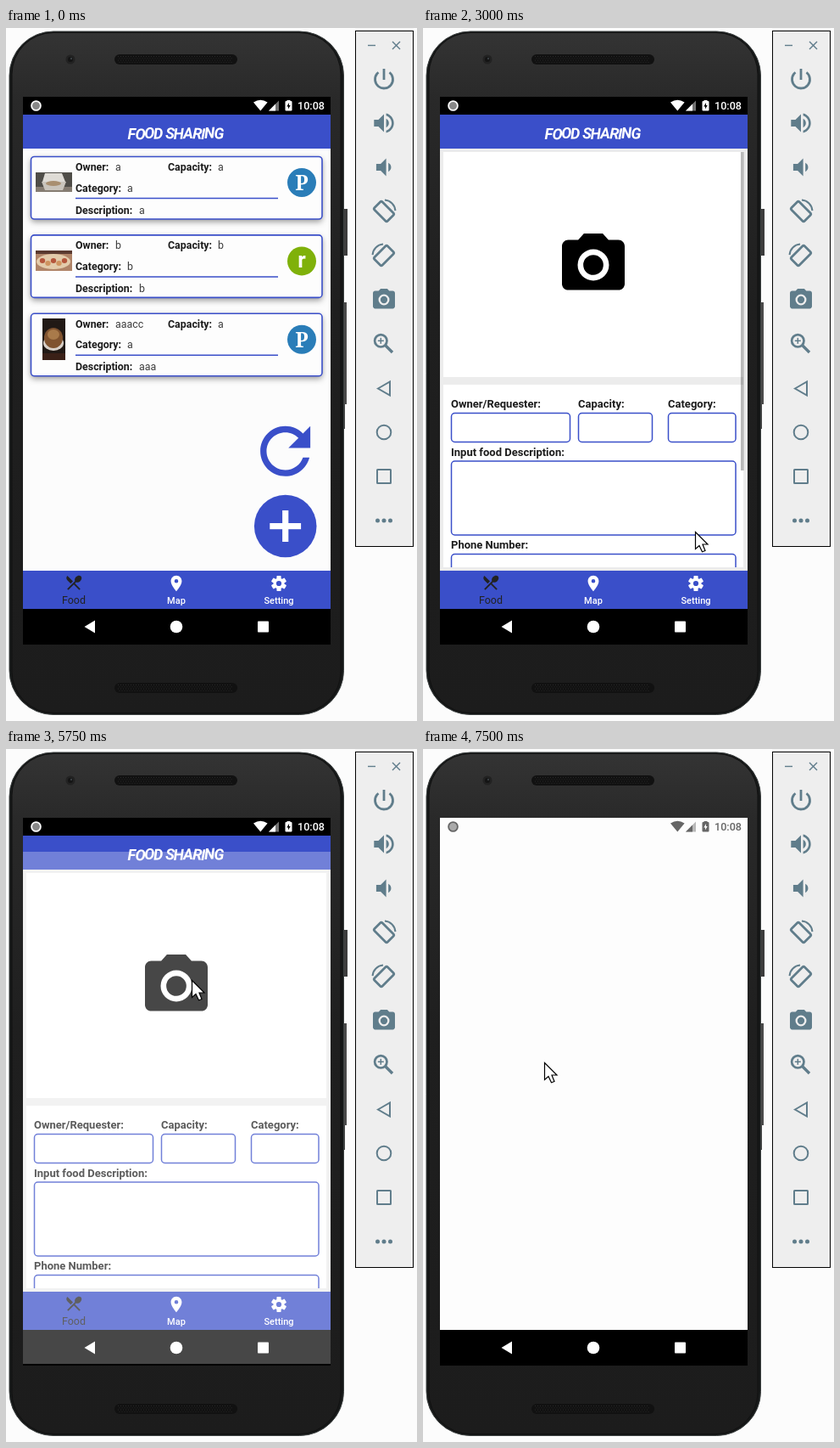
These frames come from a looping animation (485 by 816 pixels, 8 s). An HTML page with a canvas:

```html
<!DOCTYPE html>
<html lang="en">
<head>
<meta charset="utf-8">
<title>Food sharing app</title>
<style>
html, body { margin: 0; width: 100%; height: 100%; overflow: hidden; background: #fcfcfc; }
canvas { display: block; width: 485px; height: 816px; }
</style>
</head>
<body>
<canvas id="stage"></canvas>
<script>
const W = 485, H = 816, LOOP = 8000;
const BLUE = '#3a4fc9', SLATE = '#607d8b', INK = '#1c1c1c', PALE = '#ececec';
const canvas = document.getElementById('stage');
const ratio = window.devicePixelRatio || 1;
canvas.width = W * ratio;
canvas.height = H * ratio;
const ctx = canvas.getContext('2d');

const ICON = {
  refresh: 'M17.65 6.35C16.2 4.9 14.21 4 12 4c-4.42 0-7.99 3.58-7.99 8s3.57 8 7.99 8c3.73 0 6.84-2.55 7.73-6h-2.08c-.82 2.33-3.04 4-5.65 4-3.31 0-6-2.69-6-6s2.69-6 6-6c1.66 0 3.14.69 4.22 1.78L13 11h7V4z',
  dining: 'M8.1 13.34l2.83-2.83L3.91 3.5c-1.56 1.56-1.56 4.09 0 5.66zM14.88 11.53c1.53.71 3.68.21 5.27-1.38 1.91-1.91 2.28-4.65.81-6.12-1.46-1.46-4.2-1.1-6.12.81-1.59 1.59-2.09 3.74-1.38 5.27L3.7 19.87l1.41 1.41L12 14.41l6.88 6.88 1.41-1.41L13.41 13z',
  place: 'M12 2C8.13 2 5 5.13 5 9c0 5.25 7 13 7 13s7-7.75 7-13c0-3.87-3.13-7-7-7zm0 9.5a2.5 2.5 0 1 1 0-5 2.5 2.5 0 1 1 0 5z',
  camera: 'M9 2L7.17 4H4c-1.1 0-2 .9-2 2v12c0 1.1.9 2 2 2h16c1.1 0 2-.9 2-2V6c0-1.1-.9-2-2-2h-3.17L15 2zM12 7a5 5 0 1 1 0 10 5 5 0 1 1 0-10zM12 8.8a3.2 3.2 0 1 1 0 6.4 3.2 3.2 0 1 1 0-6.4z',
  quiet: 'M5 9v6h4l5 5V4L9 9zM18.5 12c0-1.77-1.02-3.29-2.5-4.03v8.05c1.48-.73 2.5-2.25 2.5-4.02z',
  loud: 'M3 9v6h4l5 5V4L7 9zM16.5 12c0-1.77-1.02-3.29-2.5-4.03v8.05c1.48-.73 2.5-2.25 2.5-4.02zM14 3.23v2.06c2.89.86 5 3.54 5 6.71s-2.11 5.85-5 6.71v2.06c4.01-.91 7-4.49 7-8.77s-2.99-7.86-7-8.77z'
};
for (const key in ICON) ICON[key] = new Path2D(ICON[key]);

// start time, x, y of the pointer tip
const POINTER = [
  [1250, 405, 572], [1500, 304, 687], [1750, 322, 594], [2000, 321, 593],
  [3500, 177, 404], [4000, 217, 273], [4250, 219, 272], [6500, 169, 224],
  [6750, 257, 313], [7000, 183, 274], [7250, 180, 320], [7500, 143, 369]
];

function rect(x, y, w, h, fill) {
  ctx.fillStyle = fill;
  ctx.fillRect(x, y, w, h);
}

function round(x, y, w, h, r, fill, stroke, width = 1) {
  ctx.beginPath();
  ctx.roundRect(x, y, w, h, r);
  paint(fill, stroke, width);
}

function paint(fill, stroke, width) {
  if (fill) { ctx.fillStyle = fill; ctx.fill(); }
  if (stroke) { ctx.strokeStyle = stroke; ctx.lineWidth = width; ctx.stroke(); }
}

function disc(x, y, r, fill, stroke, width) {
  ctx.beginPath();
  ctx.arc(x, y, r, 0, Math.PI * 2);
  paint(fill, stroke, width);
}

function oval(x, y, rx, ry, fill) {
  ctx.beginPath();
  ctx.ellipse(x, y, rx, ry, 0, 0, Math.PI * 2);
  paint(fill);
}

function poly(points, fill, stroke, width) {
  ctx.beginPath();
  points.forEach(([x, y]) => ctx.lineTo(x, y));
  ctx.closePath();
  paint(fill, stroke, width);
}

function line(x1, y1, x2, y2, color, width) {
  ctx.beginPath();
  ctx.moveTo(x1, y1);
  ctx.lineTo(x2, y2);
  paint(null, color, width);
}

function icon(path, cx, cy, scale, color) {
  ctx.save();
  ctx.translate(cx - 12 * scale, cy - 12 * scale);
  ctx.scale(scale, scale);
  ctx.fillStyle = color;
  ctx.fill(path, 'evenodd');
  ctx.restore();
}

function text(str, x, y, font, color, align = 'left') {
  ctx.font = font;
  ctx.fillStyle = color;
  ctx.textAlign = align;
  ctx.fillText(str, x, y);
}

const label = (str, x, y, size = 12.4) => text(str, x, y, `bold ${size}px Roboto, sans-serif`, INK);
const value = (str, x, y) => text(str, x, y, '12.4px Roboto, sans-serif', '#3c3c3c');

function grille(y) {
  round(128, y, 145, 12, 6, '#111');
  for (let row = 0; row < 4; row++) {
    for (let col = 0; col < 45; col++) {
      rect(132 + col * 3 + (row % 2) * 1.5, y + 2 + row * 2.3, 1, 1, '#292929');
    }
  }
}

function phone() {
  rect(398, 213, 5, 55, '#3c3c3c');
  rect(398, 323, 4, 120, '#4a4a4a');
  rect(398, 443, 2, 29, '#444');
  const body = ctx.createLinearGradient(0, 3, 0, 809);
  body.addColorStop(0, '#343434');
  body.addColorStop(0.1, '#292929');
  body.addColorStop(0.4, '#1f1f1f');
  body.addColorStop(1, '#1c1c1c');
  round(4, 4, 394.5, 804.5, 52, '#161818', '#3d4141', 1);
  round(7, 5.5, 388, 801, 49, body, '#111', 1);
  grille(31);
  grille(771);
  disc(76, 37, 5.5, '#222');
  disc(76, 37, 3, '#141414');
  disc(77, 36, 1.2, '#3a3f42');
}

function rotateIcon(y, flip) {
  ctx.save();
  ctx.translate(446, y);
  ctx.scale(flip, 1);
  ctx.beginPath();
  ctx.arc(0, 0, 13.5, -1.5, -0.07);
  paint(null, SLATE, 2);
  ctx.rotate(-Math.PI / 4);
  round(-6.6, -11, 13.2, 22, 2, null, SLATE, 2.8);
  ctx.restore();
}

function toolbar() {
  rect(412, 3, 69, 608, '#000');
  rect(413, 4, 67, 606, '#eee');
  line(427, 20.5, 436, 20.5, SLATE, 1.4);
  line(456, 16, 465, 25, SLATE, 1.4);
  line(465, 16, 456, 25, SLATE, 1.4);

  ctx.beginPath();
  ctx.arc(446, 60.5, 10.5, -0.9, Math.PI + 0.9);
  paint(null, SLATE, 2.8);
  line(446, 48, 446, 61, SLATE, 2.8);

  icon(ICON.loud, 446, 112, 1.3, SLATE);
  icon(ICON.quiet, 446, 164, 1.3, SLATE);
  rotateIcon(216, 1);
  rotateIcon(268, -1);
  icon(ICON.camera, 446, 320, 1.3, SLATE);

  disc(442.3, 368.3, 7.2, null, SLATE, 2.7);
  line(447.5, 373.5, 456, 382, SLATE, 3.4);
  line(438.8, 368.3, 445.8, 368.3, SLATE, 1.5);
  line(442.3, 364.8, 442.3, 371.8, SLATE, 1.5);

  poly([[439, 424.5], [453, 416.5], [453, 432.5]], null, SLATE, 2);
  disc(446, 476, 8.3, null, SLATE, 2);
  round(438, 520, 16, 16, 0.5, null, SLATE, 2);
  for (const x of [438.5, 446, 453.5]) disc(x, 580, 2.5, SLATE);
}

function statusBar(back, color, core) {
  rect(20, 81, 363, 21, back);
  disc(35.5, 91.5, 5.4, core, color, 1.8);
  ctx.beginPath();
  ctx.moveTo(300.3, 97.5);
  ctx.lineTo(292, 87.5);
  ctx.quadraticCurveTo(300.3, 82, 308.6, 87.5);
  ctx.closePath();
  paint(color);
  ctx.globalAlpha = 0.45;
  poly([[310, 97.5], [322, 85.5], [322, 97.5]], color);
  ctx.globalAlpha = 1;
  poly([[310, 97.5], [318, 89.5], [318, 97.5]], color);
  rect(331.5, 85, 4, 2, color);
  round(329.5, 86, 8, 11.5, 1, color);
  poly([[334, 88], [331.3, 92.5], [333, 92.5], [333, 95.5], [335.7, 91], [334, 91]], back);
  text('10:08', 376, 96, '500 12.6px Roboto, sans-serif', color, 'right');
}

function header() {
  rect(20, 102, 363, 40, BLUE);
  const title = 'FOOD SHARING', gap = -1;
  ctx.font = 'italic bold 18px Roboto, sans-serif';
  ctx.textAlign = 'left';
  ctx.fillStyle = '#fff';
  const widths = [...title].map(c => ctx.measureText(c).width + gap);
  let x = 200 - widths.reduce((a, b) => a + b) / 2;
  [...title].forEach((c, i) => {
    ctx.save();
    ctx.translate(x, 130.5 + Math.sin(i * 2.3) * 0.6);
    ctx.rotate(Math.sin(i * 1.7) * 0.05);
    ctx.fillText(c, 0, 0);
    ctx.restore();
    x += widths[i];
  });
}

function gear(cx, cy) {
  ctx.save();
  ctx.translate(cx, cy);
  for (let i = 0; i < 6; i++) {
    round(-2.6, -9, 5.2, 7, 0.8, '#fff');
    ctx.rotate(Math.PI / 3);
  }
  ctx.restore();
  disc(cx, cy, 6.5, '#fff');
  disc(cx, cy, 3.1, BLUE);
}

function tabs() {
  rect(20, 639, 363, 45, BLUE);
  icon(ICON.dining, 80, 653, 0.94, '#222');
  text('Food', 80, 677.5, '12.4px Roboto, sans-serif', '#222', 'center');
  icon(ICON.place, 201, 654, 0.92, '#fff');
  text('Map', 201, 677.5, '500 11px Roboto, sans-serif', '#fff', 'center');
  gear(322, 654);
  text('Setting', 322, 677.5, '500 11px Roboto, sans-serif', '#fff', 'center');
}

function navBar() {
  rect(20, 684, 363, 42, '#000');
  poly([[92.5, 705], [105, 697.5], [105, 712.5]], '#fff');
  disc(201, 705, 7.3, '#fff');
  round(297, 698.5, 13, 13, 0.8, '#fff');
}

const PHOTOS = [
  () => {
    rect(35, 170, 43, 23, '#4f4d48');
    rect(35, 187, 43, 6, '#857c72');
    poly([[46, 171], [66, 171], [70, 181], [43, 181]], '#dedbd5');
    poly([[42, 181], [71, 181], [67, 191], [46, 191]], '#c9c4bc');
    oval(56, 183, 9, 3, '#a98f70');
  },
  () => {
    rect(35, 262, 43, 24, '#b08468');
    rect(35, 262, 43, 4, '#5a3a30');
    oval(56, 275, 20, 9, '#e3cbab');
    for (let i = 0; i < 5; i++) oval(43 + i * 6.5, 274 + (i % 2) * 3, 3.2, 3, i % 2 ? '#cf9460' : '#b5563c');
  },
  () => {
    rect(43, 342, 27, 49, '#211915');
    oval(56, 371, 12, 9, '#d8d0c8');
    oval(56, 365, 11, 12, '#80532f');
    oval(56, 361, 7, 6, '#a97a4a');
    rect(43, 383, 27, 8, '#3a2017');
  }
];

const FOODS = [
  { owner: 'a', capacity: 'a', category: 'a', about: 'a', give: true },
  { owner: 'b', capacity: 'b', category: 'b', about: 'b', give: false },
  { owner: 'aaacc', capacity: 'a', category: 'a', about: 'aaa', give: true }
];

function card(food, i) {
  const y = 151.5 + i * 92.4;
  ctx.save();
  ctx.shadowColor = 'rgba(0,0,0,.42)';
  ctx.shadowBlur = 7 * ratio;
  ctx.shadowOffsetY = 3 * ratio;
  round(29.5, y, 343.5, 73.5, 4, '#fff');
  ctx.restore();
  round(29.5, y, 343.5, 73.5, 4, '#fdfdfd', BLUE, 1.6);
  PHOTOS[i]();
  label('Owner:', 82, y + 16.5);
  value(food.owner, 129, y + 16.5);
  label('Capacity:', 191, y + 16.5);
  value(food.capacity, 250, y + 16.5);
  label('Category:', 82, y + 41);
  value(food.category, 143, y + 41);
  line(82, y + 49, 321, y + 49, BLUE, 1.5);
  label('Description:', 82, y + 67);
  value(food.about, 157, y + 67);
  disc(349, y + 30.5, 17, food.give ? '#2a7db8' : '#7fb10a');
  if (food.give) text('P', 349, y + 39.3, 'bold 24.5px "Noto Serif", serif', '#fff', 'center');
  else text('r', 349, y + 38, 'bold 26px Roboto, sans-serif', '#fff', 'center');
}

function listPage() {
  rect(20, 142, 363, 497, '#fcfcfc');
  FOODS.forEach(card);
  icon(ICON.refresh, 329.6, 498.3, 3.69, BLUE);
  disc(329.7, 586.5, 36.8, BLUE);
  rect(311.3, 583, 36.8, 7.2, '#fff');
  rect(326.1, 568, 7.2, 37, '#fff');
}

function field(x, y, w, h) {
  round(x, y, w, h, 4, '#fff', BLUE, 1.5);
}

function formPage(barAlpha) {
  rect(20, 142, 363, 497, PALE);
  rect(24, 146, 354, 265, '#fff');
  rect(24, 420, 354, 215, '#fff');
  icon(ICON.camera, 201, 279, 3.7, '#000');
  ctx.save();
  ctx.beginPath();
  ctx.rect(24, 420, 354, 215);
  ctx.clip();
  const size = 13;
  label('Owner/Requester:', 33, 447, size);
  label('Capacity:', 183, 447, size);
  label('Category:', 289, 447, size);
  field(33.5, 453.5, 140, 34);
  field(183.5, 453.5, 87, 34);
  field(289.5, 453.5, 79.5, 34);
  label('Input food Description:', 33, 503.5, size);
  field(33.5, 510, 335.5, 87);
  label('Phone Number:', 33, 613, size);
  field(33.5, 619.5, 335.5, 34);
  ctx.restore();
  rect(375, 146, 3.5, 375, `rgba(0,0,0,${barAlpha})`);
}

function screen(t) {
  if (t >= 6000) {
    const settled = t >= 6250;
    const back = settled ? '#fdfdfd' : '#fff';
    rect(20, 81, 363, 603, back);
    statusBar(back, settled ? '#666' : '#999', settled ? '#aaa' : '#ccc');
    navBar();
    return;
  }
  statusBar('#000', '#fff', '#888');
  header();
  if (t < 3000) listPage();
  else formPage(t < 4500 ? 0.27 : t < 4750 ? 0.15 : t < 5750 ? 0.04 : 0);
  tabs();
  navBar();
  // the next window slides up while fading in
  if (t >= 5750) rect(20, 121, 363, 603, 'rgba(255,255,255,.28)');
}

function pointer(t) {
  const spot = POINTER.filter(p => p[0] <= t).pop();
  if (!spot) return;
  ctx.save();
  ctx.translate(spot[1] + 0.5, spot[2] + 0.5);
  poly([[0, 0], [0, 20], [4.5, 16], [8, 23.3], [11.5, 22], [8.5, 14.5], [14.5, 14.5]], '#fff', '#000', 1.2);
  ctx.restore();
}

function draw(t) {
  ctx.setTransform(ratio, 0, 0, ratio, 0, 0);
  rect(0, 0, W, H, '#fcfcfc');
  phone();
  toolbar();
  screen(t);
  pointer(t);
}

const start = performance.now();
function tick() {
  draw((performance.now() - start) % LOOP);
  requestAnimationFrame(tick);
}
tick();
</script>
</body>
</html>
```
